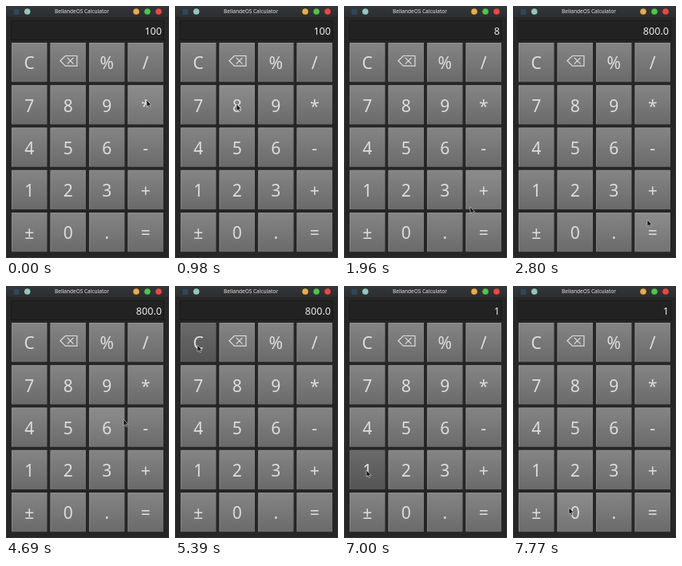
An HTML page that plays this animation: 204 px wide and 316 px high, repeating every 8 s.

```html
<!DOCTYPE html>
<html lang="en">
<head>
<meta charset="utf-8">
<title>Calculator</title>
<style>
  html, body { margin: 0; width: 100%; height: 100%; overflow: hidden; background: #242424; }
  svg { display: block; width: 204px; height: 316px; font-family: "Noto Sans", "Open Sans", sans-serif; }
  .key { font-size: 21px; fill: #dedede; text-anchor: middle; }
</style>
</head>
<body>
<svg id="stage" viewBox="0 0 204 316">
  <defs>
    <linearGradient id="face" x2="0" y2="1">
      <stop offset="0" stop-color="#858585"/>
      <stop offset="1" stop-color="#6a6a6a"/>
    </linearGradient>
    <linearGradient id="bar" x2="0" y2="1">
      <stop offset="0" stop-color="#34373a"/>
      <stop offset="1" stop-color="#2b2d2f"/>
    </linearGradient>
  </defs>
  <rect width="204" height="316" fill="#262626"/>
  <rect width="204" height="14" fill="url(#bar)"/>
  <path d="M.5 14V315.5H203.5V14" fill="none" stroke="#303234"/>
  <rect x="9.5" y="4" width="7" height="7" fill="#30465a"/>
  <circle cx="26.7" cy="7" r="3.8" fill="#92c6be"/>
  <text x="95" y="9.4" font-size="6.5" fill="#e8e8e8" text-anchor="middle">BellandeOS Calculator</text>
  <circle cx="163" cy="7" r="3.8" fill="#e8ae4c"/>
  <circle cx="177" cy="7" r="3.8" fill="#52c44a"/>
  <circle cx="191" cy="7" r="3.8" fill="#e84a42"/>
  <rect x="6.5" y="18.5" width="191" height="24" fill="#222" stroke="#191919"/>
  <text id="value" x="195" y="35.9" font-size="12.6" fill="#ececec" text-anchor="end"></text>
  <g id="keys"></g>
  <path id="cursor" d="M0 0V8.4L2 6.7L3.3 9.6L4.6 9L3.4 6.2H6Z" fill="#151515" stroke="#c8c8c8" stroke-width=".7"/>
</svg>
<script>
const LOOP = 8000, STEP = 70, HOLD = 180;
const KEY_W = 44.5, KEY_H = 49.3;
const LABELS = [..."C⌫%/789*456-123+±0.="];

// The pointer's visits; a press shows its value one step later
const VISITS = [
  { x: 176, y: 118, arrive: 0, leave: 560, key: "*", press: 140, shows: "100" },
  { x: 77, y: 123, arrive: 980, leave: 1400, key: "8", press: 1120, shows: "8" },
  { x: 168, y: 268, arrive: 2240, leave: 4620, key: "=", press: 2520, shows: "800.0" },
  { x: 147, y: 167, arrive: 4690, leave: 4690 },
  { x: 28, y: 74, arrive: 5250, leave: 5530, key: "C", press: 5390, shows: "0" },
  { x: 72, y: 170, arrive: 6230, leave: 6300 },
  { x: 28, y: 231, arrive: 6720, leave: 7000, key: "1", press: 6860, shows: "1" },
  { x: 70, y: 278, arrive: 7630, leave: LOOP }
];
const PRESSES = VISITS.filter(v => v.key);

const $ = id => document.getElementById(id);
function add(parent, tag, attrs) {
  const node = document.createElementNS("http://www.w3.org/2000/svg", tag);
  for (const name in attrs) node.setAttribute(name, attrs[name]);
  return parent.appendChild(node);
}

const keys = LABELS.map((label, i) => {
  const x = 7 + (i % 4) * 48.5, y = 46 + Math.floor(i / 4) * 53.25;
  const group = add($("keys"), "g", { transform: `translate(${x} ${y})` });
  add(group, "rect", { x: -.5, y: -.5, width: KEY_W + 1, height: KEY_H + 1, fill: "#1d1d1d" });
  add(group, "rect", { width: KEY_W, height: KEY_H, fill: "url(#face)" });
  add(group, "path", { d: "M.4 49V.5H44.2", fill: "none", stroke: "#929292", "stroke-width": .7 });
  const shade = add(group, "rect", { width: KEY_W, height: KEY_H });
  if (label === "⌫") {
    add(group, "path", {
      d: "M12.4 22.8L18.8 16.5H33.4V29.1H18.8ZM21.2 18.9L28.9 26.7M28.9 18.9L21.2 26.7",
      fill: "none", stroke: "#dedede", "stroke-width": 1.2
    });
  } else {
    add(group, "text", { class: "key", x: 22.2, y: 33.3 }).textContent = label;
  }
  return { label, x, y, shade };
});

function pointerAt(t) {
  const next = VISITS.findIndex(v => v.arrive > t);
  const from = VISITS.at(next < 0 ? -1 : next - 1);
  if (t <= from.leave) return from;
  const to = VISITS[next];
  const p = (t - from.leave) / (to.arrive - from.leave);
  const ease = 1 - (1 - p) ** 2;
  return { x: from.x + (to.x - from.x) * ease, y: from.y + (to.y - from.y) * ease };
}

function shadeKey(key, pointer, pressed) {
  const dx = pointer.x - key.x, dy = pointer.y - key.y;
  const hover = dx >= 0 && dx < KEY_W && dy >= 0 && dy < KEY_H;
  key.shade.setAttribute("fill", pressed ? "#000" : "#fff");
  key.shade.setAttribute("opacity", pressed ? .2 : hover ? .06 : 0);
}

function draw(now) {
  const t = Math.floor(now % LOOP / STEP) * STEP;
  const pointer = pointerAt(t);
  const down = PRESSES.find(v => t >= v.press && t < v.press + HOLD);
  const shown = PRESSES.findLast(v => t >= v.press + STEP) || PRESSES[0];
  $("cursor").setAttribute("transform", `translate(${pointer.x} ${pointer.y})`);
  $("value").textContent = shown.shows;
  for (const key of keys) shadeKey(key, pointer, down?.key === key.label);
}

const start = performance.now();
function tick() {
  draw(performance.now() - start);
  requestAnimationFrame(tick);
}
tick();
</script>
</body>
</html>
```
